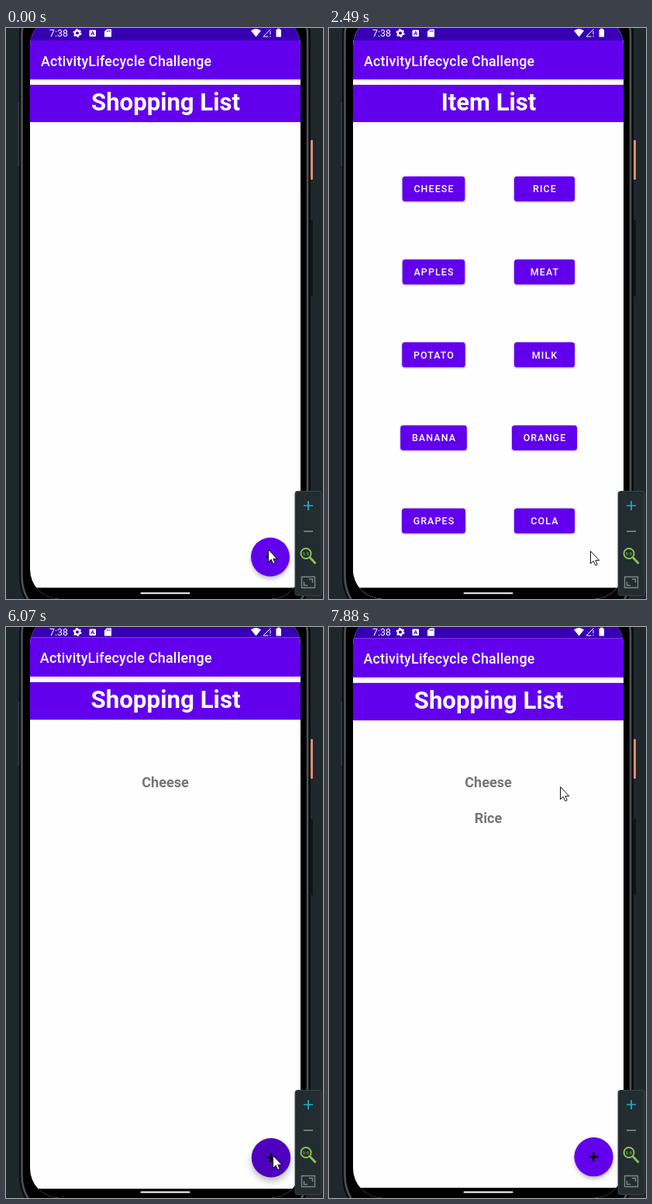
Animation, 409 px wide and 734 px high, one loop 8000 ms. Source, as an HTML page:

```html
<!DOCTYPE html>
<html lang="en">
<head>
<meta charset="utf-8">
<title>Shopping list</title>
<style>
  html, body { margin: 0; width: 100%; height: 100%; overflow: hidden; background: #1e282c; }
  svg { display: block; width: 409px; height: 734px; font-family: Roboto, sans-serif; }
  .bar { font-size: 17.8px; font-weight: 500; fill: #fff; letter-spacing: .0125em; }
  .head { font-size: 31.1px; font-weight: 700; fill: #fff; text-anchor: middle; }
  .entry { font-size: 18px; font-weight: 700; fill: #757575; text-anchor: middle; }
  .label { font-size: 12.44px; font-weight: 500; fill: #fff; text-anchor: middle; letter-spacing: .0893em; }
  .btn rect { fill: #6200ee; filter: drop-shadow(0 1.2px 1px rgba(0,0,0,.36)); }
  .btn .flash { fill: #fff; filter: none; opacity: 0; }
  #disc { fill: #6200ee; }
</style>
</head>
<body>
<svg viewBox="0 0 409 734">
  <defs>
    <clipPath id="display"><rect x="31" y="-15" width="349" height="749" rx="38"/></clipPath>
    <linearGradient id="fade" x2="0" y2="1">
      <stop stop-color="#d6d6d8"/><stop offset="1" stop-color="#fefefe"/>
    </linearGradient>
  </defs>

  <!-- phone body -->
  <rect width="409" height="734" fill="#1e282c"/>
  <rect x="17" y="-50" width="376" height="816" rx="60" fill="#0a0c0d"/>
  <rect x="20.500" y="-48" width="368.500" height="811" rx="58" stroke="#4d5154" stroke-width="2.600"/>
  <rect x="15.500" y="96" width="1.500" height="82" fill="#353d41"/>
  <rect x="393" y="144" width="3" height="51" rx="1" fill="#e08a72"/>
  <rect x="393" y="247" width="3" height="98" rx="1" fill="#101517"/>

  <g clip-path="url(#display)">
    <g id="shop"></g>
    <g id="items"></g>
    <!-- status icons -->
    <g fill="#fff">
      <text x="56" y="11" font-size="12.4">7:38</text>
      <circle cx="92" cy="6.500" r="3.200" fill="none" stroke="#fff" stroke-width="2.400"/>
      <circle cx="92" cy="6.500" r="4.700" fill="none" stroke="#fff" stroke-width="1.600" stroke-dasharray="2.4 2.52"/>
      <rect x="107.500" y="2.500" width="8.500" height="8.500" rx="1"/>
      <path d="M109.700 9L111.750 4.300L113.800 9M110.500 7.600H113" fill="none" stroke="#3700b3"/>
      <path d="M130 1.500H136V11.500H127V4.500Z"/>
      <path d="M130.500 3V5M132.300 3V5M134.100 3V5" stroke="#3700b3" stroke-width=".8"/>
      <path d="M316 3.600Q322.500 -1.400 329 3.600L322.500 11.500Z"/>
      <path d="M332 11H338.500M332 11L341.500 1.500M341 4V8.500M341 10V11.500" fill="none" stroke="#fff"/>
      <path d="M348.500 2H350V.8H353.500V2H355V11.500H348.500Z"/>
    </g>
    <rect x="173.500" y="725.500" width="64" height="2" rx="1" fill="#fff"/>
  </g>

  <!-- emulator tools -->
  <rect x="373" y="595.500" width="34" height="134" rx="3" fill="#222c31" stroke="#3a454b"/>
  <g fill="none" stroke-width="1.700">
    <path d="M384 614H396M390 608V620" stroke="#20b0c8"/>
    <path d="M384 647H396" stroke="#7d8588"/>
    <circle cx="387" cy="675.500" r="6.500" stroke="#8bc34a" stroke-width="2"/>
    <path d="M392 680.500L399.500 688.500" stroke="#8bc34a" stroke-width="2.800"/>
    <path d="M381.500 705.500H398.500V719.500H381.500ZM384.500 712V716.500H389M391 708.500H395.500V713" stroke="#7d8588" stroke-width="1.400"/>
  </g>
  <text x="387" y="677.700" font-size="6" font-weight="700" text-anchor="middle" fill="#8bc34a">1:1</text>

  <path id="cursor" d="M.5 .5V16.500L4.200 13.200L6.700 18.700L9.200 17.600L6.800 12.300H11.700Z" fill="#fff" stroke="#111" stroke-linejoin="round"/>
</svg>

<script>
const LOOP = 8000, STEP = LOOP / 61;
const MID = [205.5, 367];
const $ = id => document.getElementById(id);
const clamp = v => Math.max(0, Math.min(1, v));

const page = (title, body) => `
  <rect x="31" y="-22" width="349" height="756" fill="#fefefe"/>
  <rect x="31" y="-22" width="349" height="38" fill="#3700b3"/>
  <rect x="31" y="16" width="349" height="50" fill="#6200ee"/>
  <rect x="31" y="66" width="349" height="3.500" fill="url(#fade)"/>
  <text class="bar" x="45" y="48.500">ActivityLifecycle Challenge</text>
  <rect x="31" y="73" width="349" height="48" fill="#6200ee"/>
  <text class="head" x="206" y="106">${title}</text>
  ${body}
  <rect x="31" y="719.500" width="349" height="30"/>`;

const button = (name, x, y) => `<g class="btn" id="${name}">
  <rect y="${y}" height="32" rx="3.500"/>
  <rect class="flash" y="${y}" height="32" rx="3.500"/>
  <text class="label" x="${x + .5}" y="${y + 20.5}">${name}</text></g>`;

const columns = {
  135: ['CHEESE', 'APPLES', 'POTATO', 'BANANA', 'GRAPES'],
  278: ['RICE', 'MEAT', 'MILK', 'ORANGE', 'COLA']
};

$('shop').innerHTML = page('Shopping List', `
  <text class="entry" id="first" x="205.500" y="207">Cheese</text>
  <text class="entry" id="second" x="205.500" y="252.300">Rice</text>
  <circle id="disc" cx="341" cy="680" r="25"/>
  <circle id="ripple" cx="341" cy="680" opacity=".2"/>
  <path d="M335.200 679.800H346.800M341 674V685.600" stroke="#000" stroke-width="2.500"/>`);
$('items').innerHTML = page('Item List', Object.entries(columns).map(([x, names]) =>
  names.map((name, i) => button(name, +x, 190.8 + i * 106.65)).join('')).join(''));

// Buttons fit their label, with a minimum width
document.querySelectorAll('.btn').forEach(btn => {
  const label = btn.querySelector('text');
  const w = Math.max(78.2, label.getComputedTextLength() + 28.4);
  btn.querySelectorAll('rect').forEach(r => {
    r.setAttribute('width', w);
    r.setAttribute('x', label.getAttribute('x') - .5 - w / 2);
  });
});

// Pointer stops: time, x, y
const stops = [
  [0, 338, 670], [500, 338, 674.5], [2470, 338, 673], [3140, 121, 207],
  [3850, 119, 207], [4455, 281, 467], [5000, 345, 702], [5250, 344, 679],
  [6160, 344, 679], [6550, 250, 293], [6680, 250, 293], [7280, 298, 205]
];

const taps = [1270, 5600];
const moves = [1778, 3848, 6003, 7652];   // open and close in turn

function pointer(t) {
  const i = stops.findIndex(s => s[0] > t);
  if (i < 0) return stops[stops.length - 1].slice(1);
  const [a, b] = [stops[i - 1], stops[i]];
  const u = (t - a[0]) / (b[0] - a[0]), e = u * u * (3 - 2 * u);
  return [1, 2].map(k => a[k] + (b[k] - a[k]) * e);
}

const bez = (a, b, c, d, s) => {
  const r = 1 - s;
  return a * r * r * r + 3 * b * r * r * s + 3 * c * r * s * s + d * s * s * s;
};

// Fast start, very slow finish: two joined Bezier pieces
function ease(x) {
  if (x <= 0 || x >= 1) return clamp(x);
  const early = x < 1 / 6;
  const px = early ? [0, .05, .13333, .16667] : [.16667, .20833, .25, 1];
  const py = early ? [0, 0, .06, .4] : [.4, .82, 1, 1];
  let lo = 0, hi = 1;
  for (let i = 0; i < 24; i++) {
    const m = (lo + hi) / 2;
    if (bez(...px, m) < x) lo = m; else hi = m;
  }
  return bez(...py, lo);
}

function place(id, scale, alpha) {
  const [x, y] = MID;
  $(id).setAttribute('transform', `translate(${x} ${y}) scale(${scale}) translate(${-x} ${-y})`);
  $(id).setAttribute('opacity', alpha);
}

const show = (id, on) => { $(id).style.visibility = on ? 'visible' : 'hidden'; };

function flash(id, t, end) {
  $(id).querySelector('.flash').style.opacity = t > end - 60 && t < end + 300 ? .2 : 0;
}

function draw(t) {
  const past = moves.filter(m => m <= t);
  const dt = past.length ? t - past[past.length - 1] : LOOP;
  const p = dt > 300 ? 1 : ease(dt / 400);
  if (past.length % 2) {
    place('shop', 1 + .15 * p, 1);
    place('items', .85 + .15 * p, clamp((dt - 50) / 83));
  } else {
    place('shop', 1.1 - .1 * p, 1);
    place('items', 1 - .1 * p, 1 - clamp((dt - 35) / 83));
  }

  const tap = taps.find(a => t >= a && t < a + 900);
  const press = tap ? clamp((t - tap) / 260) : 0;
  $('ripple').setAttribute('r', press ? 6 + 19 * press : 0);
  $('disc').style.filter =
    `drop-shadow(0 ${3 + 2 * press}px ${2.5 + 1.5 * press}px rgba(0,0,0,.26))`;

  show('first', t >= moves[1]);
  show('second', t >= moves[3]);
  flash('CHEESE', t, moves[1]);
  flash('RICE', t, moves[3]);
  $('cursor').setAttribute('transform', `translate(${pointer(t).map(Math.round)})`);
}

const start = performance.now();
let last;
function tick() {
  const t = (performance.now() - start) % LOOP;
  const step = Math.floor(t / STEP + .1) % 61;
  if (step !== last) draw((last = step) * STEP);
  requestAnimationFrame(tick);
}
tick();
</script>
</body>
</html>
```
